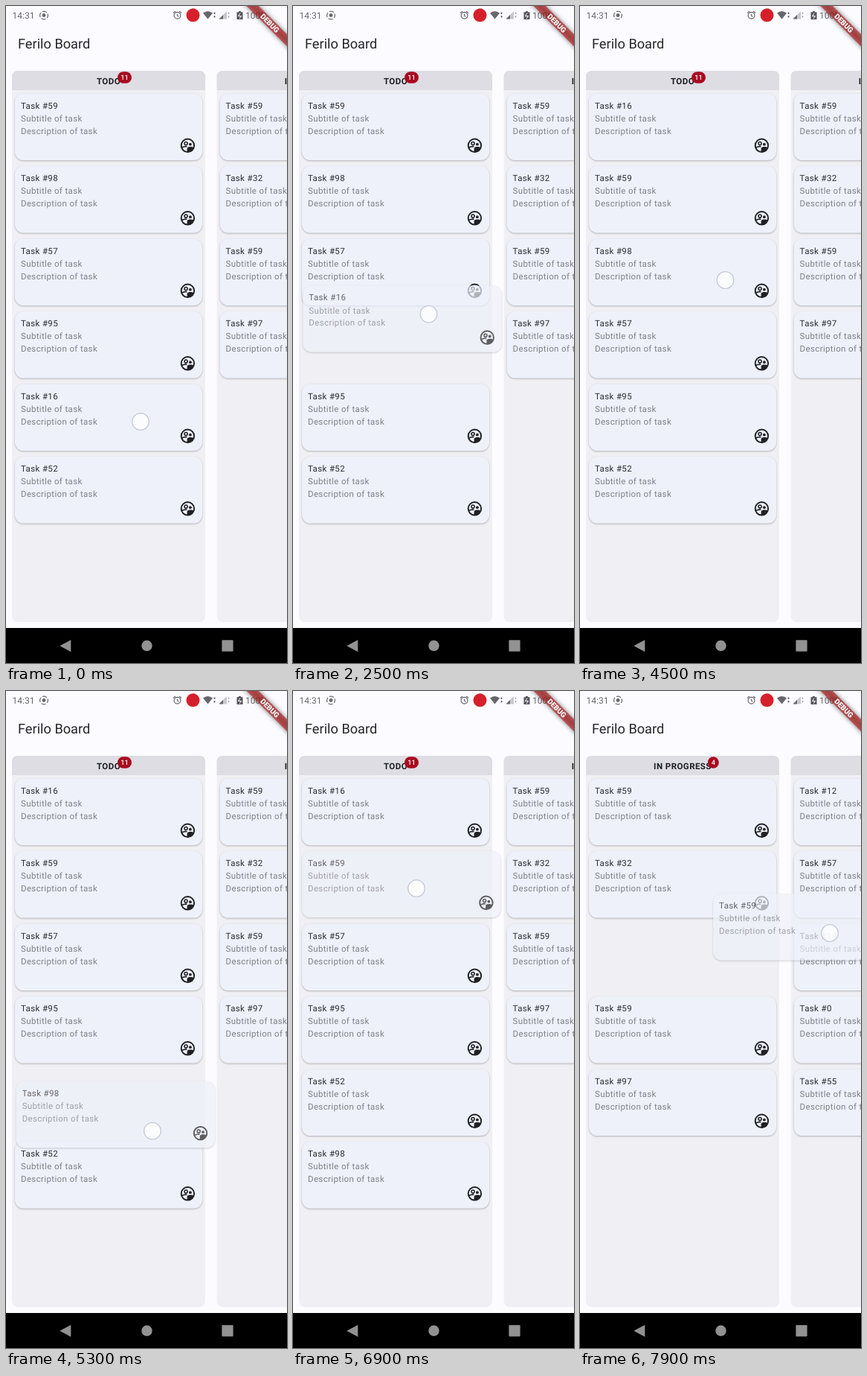
These frames come from a looping animation (378 by 882 pixels, 8 s). An HTML page:

```html
<!DOCTYPE html>
<html lang="en">
<head>
<meta charset="utf-8">
<title>Task board</title>
<style>
  html, body { margin: 0; width: 100%; height: 100%; overflow: hidden; background: #fcfbff; }
  svg { display: block; width: 100vw; height: 100vh; }
  text { font-family: Roboto, "Liberation Sans", sans-serif; text-rendering: geometricPrecision; }
  .title { font-size: 18.2px; fill: #25262a; }
  .status { font-size: 12px; fill: #66666b; }
  .header { font-size: 11.5px; font-weight: 700; letter-spacing: .45px; fill: #1d1e22; text-anchor: middle; }
  .count { font-size: 9.2px; font-weight: 500; fill: #fff; text-anchor: middle; }
  .name, .info { font-size: 11.5px; letter-spacing: .36px; fill: #2b2c31; }
  .info { fill: #808188; }
  .card rect { fill: #eef1fa; filter: drop-shadow(0 1px .8px rgba(0, 0, 0, .26)); }
  .debug { font-size: 9.8px; font-weight: 900; fill: #fff; text-anchor: middle; }
</style>
</head>
<body>
<svg id="stage" viewBox="0 0 378 882" xmlns="http://www.w3.org/2000/svg">
  <defs>
    <g id="people" transform="scale(.97)">
      <circle r="9" fill="none" stroke="#202125" stroke-width="2"/>
      <circle cx="-2.4" cy="-2.8" r="2.1" fill="none" stroke="#202125" stroke-width="1.6"/>
      <circle cx="3.6" cy="-1.7" r="1.95" fill="#202125"/>
      <path d="M-8 2.8Q-5.2.9-1 1.5" fill="none" stroke="#202125" stroke-width="1.6"/>
      <path d="M-.8 9V4.2C-.8 2.300 1.800 1.700 3.600 1.700 5.400 1.700 7.600 2.200 8.600 3.100L6 7.400 1 9.400Z" fill="#202125"/>
    </g>
  </defs>
  <rect width="378" height="882" fill="#fcfbff"/>
  <g id="board"></g>
  <g id="drag" opacity=".7"></g>
  <text class="title" x="16" y="57">Ferilo Board</text>

  <g id="statusbar" fill="none" stroke="#66666b" stroke-width="1.2">
    <circle cx="51" cy="12.5" r="5.4" stroke-dasharray="6.5 2" stroke-dashoffset="3"/>
    <circle cx="51" cy="12.5" r="2.4" fill="#66666b" stroke="none"/>
    <circle cx="230.5" cy="12.8" r="4.4"/>
    <path d="M230.5 10.5V13L232.5 14.3M225 9.5L228 7M236 9.5L233 7"/>
    <circle cx="251.5" cy="12.3" r="9" fill="#d5202b" stroke="none"/>
    <path d="M265 9.5Q271.5 4.5 278 9.5L271.5 17.5Z" fill="#66666b" stroke="none"/>
    <path d="M280.5 8.5V11M280.5 13V15.5" stroke-width="1.8"/>
    <path d="M286.5 17.5L297 7V17.5Z" fill="#c8c8cc" stroke="none"/>
    <path d="M286.5 17.5L292 12V17.5Z" fill="#66666b" stroke="none"/>
    <path d="M299.5 8.5V11M299.5 13V15.5" stroke="#a5a5aa" stroke-width="1.5"/>
    <path d="M310.5 8.2H313V7H316V8.2H318.5V18H310.5Z" fill="#55555a" stroke="none"/>
    <path d="M315 9.5L312.5 13.5H316.5L314 17" stroke="#fff" stroke-width="1"/>
  </g>
  <text class="status" x="8.5" y="17">14:31</text>
  <text class="status" x="322" y="17">100%</text>

  <g transform="translate(378 0) rotate(45)">
    <rect x="-48" y="26.900" width="96" height="11.500" fill-opacity=".5" style="filter:blur(3px)"/>
    <rect x="-48" y="26.900" width="96" height="11.500" fill="#b71c1c" fill-opacity=".63"/>
    <text class="debug" y="36.100">DEBUG</text>
  </g>

  <rect y="835" width="378" height="47"/>
  <g fill="#929292">
    <path d="M72.3 859L87.3 851V867Z"/>
    <circle cx="189.5" cy="858.8" r="7.2"/>
    <rect x="290.4" y="851.2" width="15.2" height="15.2" rx="1"/>
  </g>
  <circle id="touch" r="11.3" fill="#fff" fill-opacity=".78" stroke="#c3c8d8" stroke-width="1.3"/>
</svg>
<script>
const LOOP = 8000, PITCH = 97.5, TOP = 117.5, COLUMN = 275.6, LAG = 30, SHIFT = 150;
const $ = id => document.getElementById(id);

function add(parent, tag, attrs, text) {
  const el = document.createElementNS('http://www.w3.org/2000/svg', tag);
  for (const key in attrs) el.setAttribute(key, attrs[key]);
  if (text !== undefined) el.textContent = text;
  parent.appendChild(el);
  return el;
}
const move = (el, x, y) => el.setAttribute('transform', `translate(${x.toFixed(2)} ${y.toFixed(2)})`);
const show = (el, on) => el.setAttribute('visibility', on ? 'visible' : 'hidden');
const clamp = v => Math.max(0, Math.min(1, v));
const ease = v => 1 - Math.pow(1 - clamp(v), 2.2);

// Each order takes effect at its time; an underscore is an open gap.
const columns = [
  { title: 'TODO', count: '11', badge: 21.5, orders: [
    [0, '59 98 57 95 16 52'],
    [2200, '59 98 57 16 95 52'],
    [2780, '59 98 16 57 95 52'],
    [2980, '59 16 98 57 95 52'],
    [3150, '16 59 98 57 95 52'],
    [4850, '16 59 57 98 95 52'],
    [5080, '16 59 57 95 98 52'],
    [5400, '16 59 57 95 52 98'],
    [7270, '16 57 95 52 98']] },
  { title: 'IN PROGRESS', count: '4', badge: 41.3, orders: [
    [0, '59 32 59b 97'],
    [7270, '59 32 _ 59b 97']] },
  { title: 'DONE', count: '5', badge: 21, orders: [
    [0, '12 57 19 0 55']] }
];

// Touch path points are [time, x, y]; grip is the touch point within the card.
const drags = [
  { id: '16', lift: 1900, drop: 3720, up: 3760, grip: [169.2, 49.5], path: [
    [0, 181, 558], [1750, 181, 558], [2000, 181.5, 552], [2200, 183, 525], [2500, 182.5, 414],
    [2750, 178, 325], [2960, 170, 245], [3200, 173, 172], [3360, 178, 155], [3760, 178, 155]] },
  { id: '98', lift: 4600, drop: 5950, up: 5980, grip: [182.5, 55.5], path: [
    [4250, 195.5, 368], [4600, 195.5, 368], [4900, 187.5, 440], [5000, 188, 480],
    [5300, 197, 590], [5400, 197, 655], [5650, 196, 696], [5980, 196, 668]] },
  { id: '59', lift: 6850, drop: LOOP, up: LOOP, grip: [154, 50.5], path: [
    [6450, 166, 265], [6920, 166, 265], [7150, 225, 347], [7300, 274, 330], [7430, 309, 319],
    [7500, 328, 323], [7870, 333, 322.5], [7900, 336, 325], [8000, 339, 326]] }
];

function makeCard(parent, id, width) {
  const card = add(parent, 'g', { class: 'card' });
  add(card, 'rect', { width, height: 89.5, rx: 11.5 });
  add(card, 'text', { class: 'name', x: 8, y: 20.2 }, 'Task #' + parseInt(id));
  add(card, 'text', { class: 'info', x: 8, y: 37.4 }, 'Subtitle of task');
  add(card, 'text', { class: 'info', x: 8, y: 54.2 }, 'Description of task');
  add(add(card, 'g', { transform: `translate(${width - 19.6} 69.8)` }), 'use', { href: '#people' });
  return card;
}

columns.forEach((col, i) => {
  const g = add($('board'), 'g', { transform: `translate(${8 + i * COLUMN} 0)` });
  add(g, 'rect', { y: 87, width: 260, height: 740, rx: 8, fill: '#f0eff4' });
  add(g, 'path', { d: 'M0 113V95Q0 87 8 87H252Q260 87 260 95V113Z', fill: '#dddde3' });
  add(g, 'text', { class: 'header', x: 130, y: 104.5 }, col.title);
  const wide = col.count.length > 1 ? 19 : 15;
  add(g, 'rect', { x: 130 + col.badge - wide / 2, y: 88.3, width: wide, height: 15.4, rx: 7.7, fill: '#a90a20' });
  add(g, 'text', { class: 'count', x: 130 + col.badge, y: 99.3 }, col.count);
  col.orders = col.orders.map(([at, ids]) => [at, ids.split(' ')]);
  col.cards = col.orders[0][1].map(id => ({ id, el: makeCard(g, id, 252) }));
});
drags.forEach(d => { d.el = makeCard($('drag'), d.id, 267.5); });

function pointAt(path, t) {
  const i = path.findIndex(p => p[0] > t);
  if (i === 0) return path[0].slice(1);
  if (i < 0) return path[path.length - 1].slice(1);
  const [t0, x0, y0] = path[i - 1], [t1, x1, y1] = path[i];
  const k = (t - t0) / (t1 - t0);
  return [x0 + (x1 - x0) * k, y0 + (y1 - y0) * k];
}

function slotAt(orders, id, t) {
  let n = orders.length - 1;
  while (n > 0 && orders[n][0] > t) n--;
  const [at, ids] = orders[n];
  const to = ids.indexOf(id);
  if (to < 0 || n === 0) return to;
  const from = orders[n - 1][1].indexOf(id);
  return from + (to - from) * ease((t - at) / SHIFT);
}

function draw(t) {
  const scroll = COLUMN * ease((t - 7288) / 430);
  move($('board'), -scroll, 0);

  const held = drags.find(d => t >= d.lift && t < d.drop);
  columns.forEach((col, i) => col.cards.forEach(({ id, el }) => {
    const slot = slotAt(col.orders, id, t);
    show(el, slot >= 0 && !(i === 0 && held && held.id === id));
    if (slot >= 0) move(el, 4, TOP + slot * PITCH);
  }));

  drags.forEach(d => {
    show(d.el, d === held);
    const [x, y] = pointAt(d.path, t - LAG);
    move(d.el, x - d.grip[0], y - d.grip[1]);
  });

  const touching = drags.find(d => t >= d.path[0][0] && t < d.up);
  show($('touch'), touching);
  if (touching) move($('touch'), ...pointAt(touching.path, t));
}

const start = performance.now();
function tick() {
  draw((performance.now() - start) % LOOP);
  requestAnimationFrame(tick);
}
tick();
</script>
</body>
</html>
```
